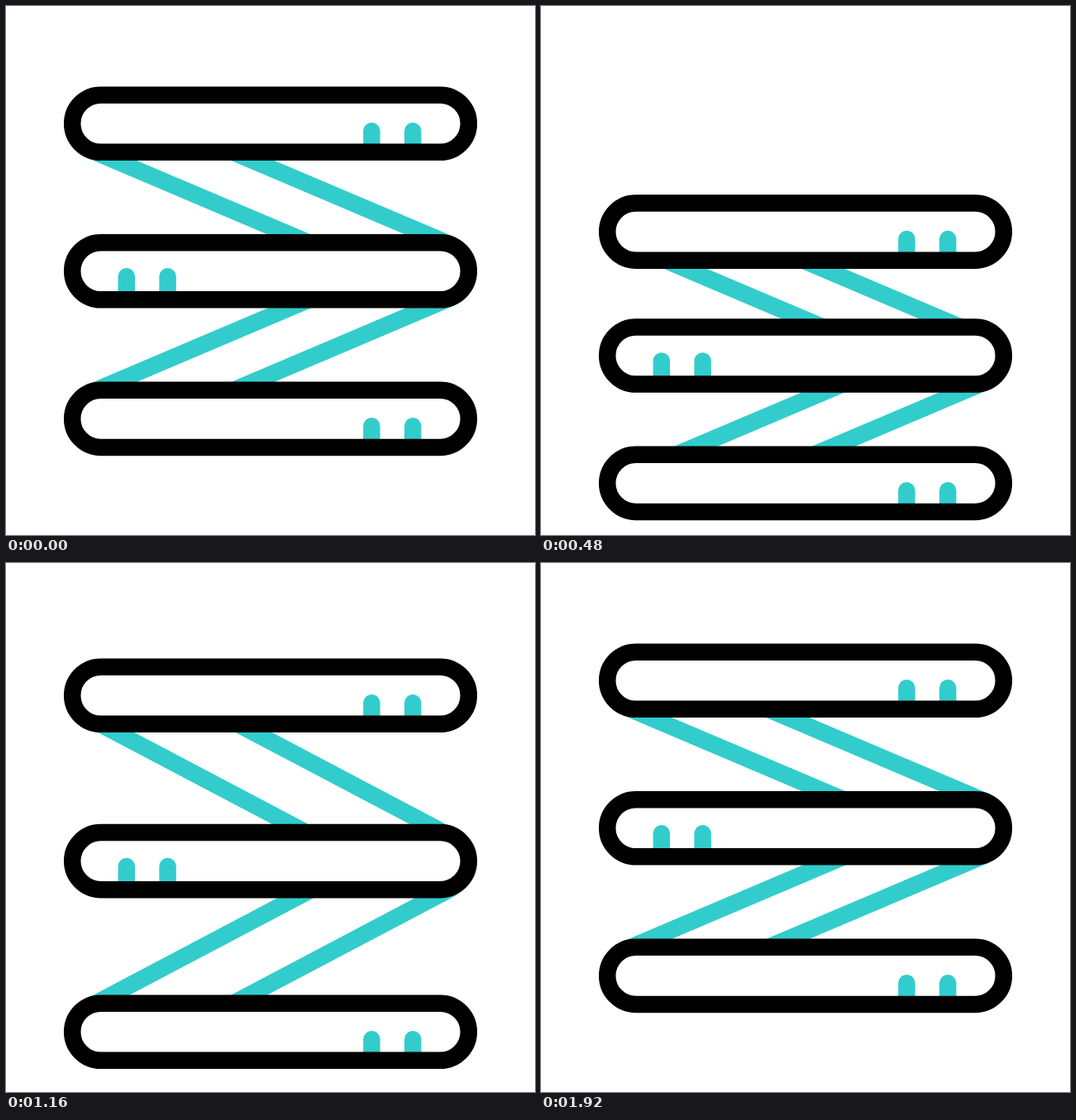
An HTML page with a canvas that plays this animation: 640 by 640 pixels, repeating every 2 s.

```html
<!DOCTYPE html>
<html lang="en">
<head>
<meta charset="utf-8">
<title>Server stack</title>
<style>
  html, body { margin: 0; width: 100%; height: 100%; overflow: hidden; background: #fff; }
  canvas { display: block; width: 100vw; height: 100vh; }
</style>
</head>
<body>
<canvas id="stage" width="640" height="640"></canvas>
<script>
const ctx = document.getElementById('stage').getContext('2d');
const LOOP = 2000, STEP = 40;
const TEAL = '#33cccc', LINE = 20.5, HEIGHT = 89.6;
const STRUT_GAP = 166.5, STRUT_OVERLAP = 13;

// Pose: tops of the three units, middle x of the upper and lower struts, strut angle
const rest     = [97.5, 276, 454.6, 237, 237.5, 23];
const squashed = [243.5, 394, 548, 246, 264.5, 23];
const low      = [218.4, 368, 522.5, 245.5, 264, 23];
const tall     = [115.5, 315.8, 522.5, 238.5, 239, 27.8];

const moves = [
  { start: 80, end: 320, from: rest, to: squashed },
  { start: 320, end: 600, from: squashed, to: low },
  { start: 680, end: 1160, from: low, to: tall },
  { start: 1320, end: 1880, from: tall, to: rest, settle: 0.44 }
];

// Cubic bezier (1/3, 0, settle, 1), solved by bisection
function ease(u, settle = 2 / 3) {
  if (u <= 0 || u >= 1) return Math.min(1, Math.max(0, u));
  let lo = 0, hi = 1, s = 0.5;
  for (let i = 0; i < 30; i++) {
    s = (lo + hi) / 2;
    const r = 1 - s;
    if (r * r * s + 3 * r * s * s * settle + s * s * s < u) lo = s;
    else hi = s;
  }
  return s * s * (3 - 2 * s);
}

function poseAt(t) {
  let pose = rest;
  for (const { start, end, from, to, settle } of moves) {
    if (t < start) break;
    const k = ease((t - start) / (end - start), settle);
    pose = from.map((v, i) => v + (to[i] - v) * k);
  }
  return pose;
}

function line(x1, y1, x2, y2, cap) {
  ctx.strokeStyle = TEAL;
  ctx.lineCap = cap;
  ctx.beginPath();
  ctx.moveTo(x1, y1);
  ctx.lineTo(x2, y2);
  ctx.stroke();
}

function struts(upperTop, lowerTop, x, angle, dir) {
  const y1 = upperTop + HEIGHT - STRUT_OVERLAP;
  const y2 = lowerTop + STRUT_OVERLAP;
  const dx = dir * (y2 - y1) / 2 / Math.tan(angle * Math.PI / 180);
  for (const cx of [x, x + STRUT_GAP]) line(cx - dx, y1, cx + dx, y2, 'butt');
}

function unit(top, pegs, pegTop) {
  const h = HEIGHT - LINE;
  const outline = new Path2D();
  outline.roundRect(80.2, top + LINE / 2, 479.6, h, h / 2);
  ctx.fillStyle = '#fff';
  ctx.fill(outline);
  for (const x of pegs) line(x, top + pegTop + LINE / 2, x, top + 72, 'round');
  ctx.strokeStyle = '#000';
  ctx.stroke(outline);
}

function draw(t) {
  const [top, middle, bottom, upperX, lowerX, angle] = poseAt(t);
  const right = [442.4, 492.2], left = [145.8, 195.6];
  ctx.fillStyle = '#fff';
  ctx.fillRect(0, 0, 640, 640);
  ctx.lineWidth = LINE;
  struts(top, middle, upperX, angle, 1);
  struts(middle, bottom, lowerX, angle, -1);
  unit(top, right, 43.4);
  unit(middle, left, 41);
  unit(bottom, right, 43.4);
}

const began = performance.now();
function tick() {
  const t = (performance.now() - began) % LOOP;
  draw(Math.floor(t / STEP) * STEP);
  requestAnimationFrame(tick);
}
tick();
</script>
</body>
</html>
```
